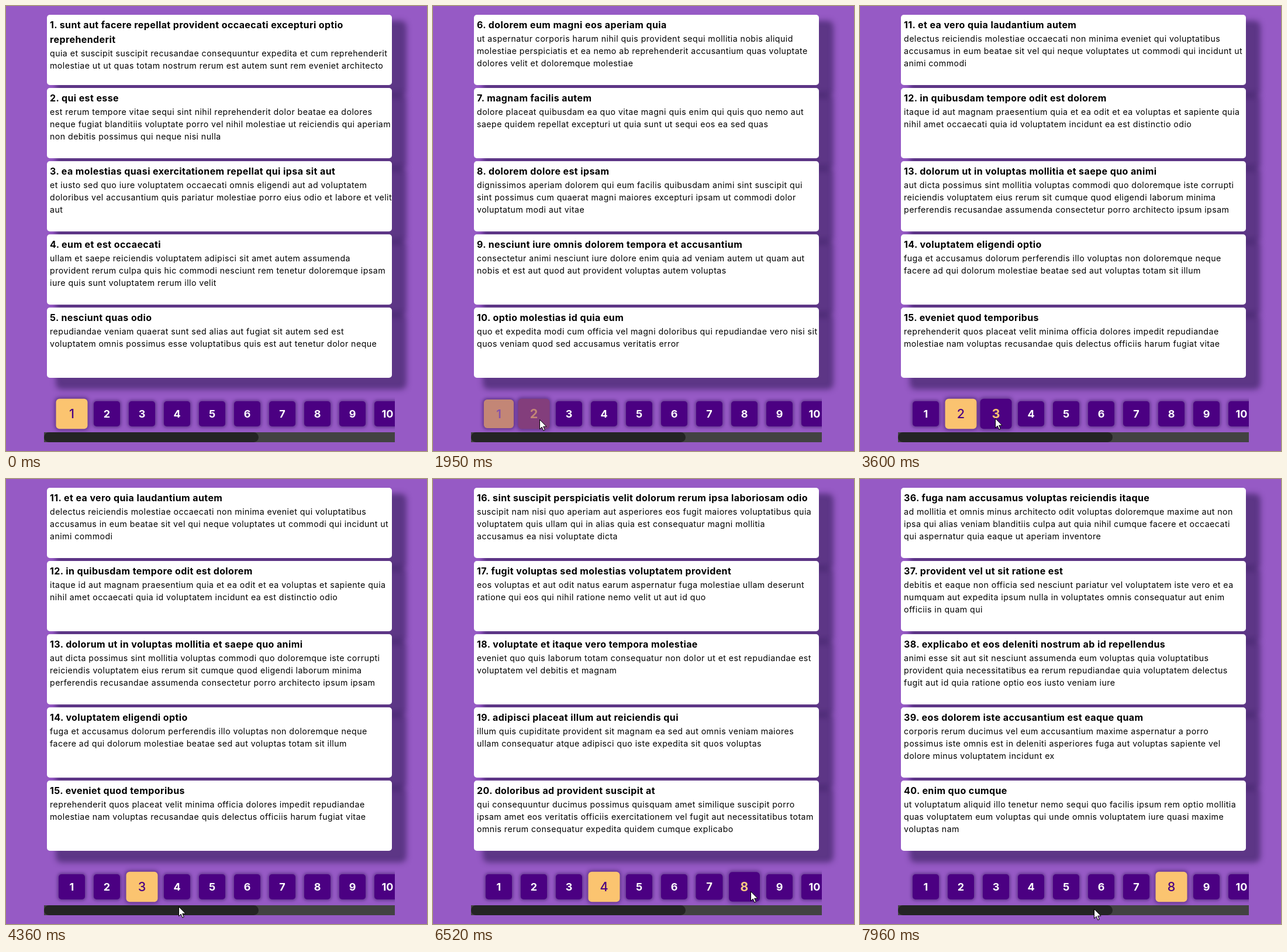
Write an HTML page that moves like this. It is 720 px wide and 760 px high and loops after 8 s.

```html
<!DOCTYPE html>
<html lang="la">
<head>
<meta charset="utf-8">
<title>Paged posts</title>
<style>
  html, body { margin: 0; width: 100%; height: 100%; overflow: hidden; background: #965ac5; }
  body { position: relative; font-family: Inter, "Open Sans", sans-serif; color: #000; }
  .card {
    position: absolute; left: 70px; width: 590px; height: 120px; padding: 5px;
    box-sizing: border-box; border-radius: 5px; background: #fff; white-space: nowrap;
    box-shadow: 20px 15px 10px 5px rgba(35, 18, 72, .5);
  }
  .card h2 { margin: 0; font-size: 16px; font-weight: 700; line-height: 25px; letter-spacing: .4px; }
  .card p { margin: 0; font-size: 14.2px; font-weight: 400; line-height: 21px; letter-spacing: .44px; }
  #pager { position: absolute; left: 65px; top: 660px; width: 600px; height: 85px; overflow: hidden; }
  .btn {
    position: absolute; top: 15px; width: 45px; height: 43px; border-radius: 5px;
    font-size: 18px; line-height: 43px; text-align: center;
    box-shadow: 0 0 5px 2px rgba(45, 15, 85, .5);
  }
  #track { position: absolute; top: 68px; width: 600px; height: 17px; background: #424242; }
  #thumb { width: 367px; height: 17px; border-radius: 9px; background: #242424; }
  #cursor { position: absolute; left: 0; top: 0; overflow: visible; }
</style>
</head>
<body>
<div id="cards"></div>
<div id="pager"><div id="track"><div id="thumb"></div></div></div>
<svg id="cursor" width="13" height="20">
  <path d="M.5 .5V16.6L4.2 13.1 6.8 19.2 9.3 18.1 6.7 12.2H12Z" fill="#fff" stroke="#000"/>
</svg>
<script>
const LOOP = 8000, FADE = 400;

// One post per row: title|line|line; "/" breaks a title.
const pages = {
1: `sunt aut facere repellat provident occaecati excepturi optio/reprehenderit|quia et suscipit suscipit recusandae consequuntur expedita et cum reprehenderit|molestiae ut ut quas totam nostrum rerum est autem sunt rem eveniet architecto
qui est esse|est rerum tempore vitae sequi sint nihil reprehenderit dolor beatae ea dolores|neque fugiat blanditiis voluptate porro vel nihil molestiae ut reiciendis qui aperiam|non debitis possimus qui neque nisi nulla
ea molestias quasi exercitationem repellat qui ipsa sit aut|et iusto sed quo iure voluptatem occaecati omnis eligendi aut ad voluptatem|doloribus vel accusantium quis pariatur molestiae porro eius odio et labore et velit|aut
eum et est occaecati|ullam et saepe reiciendis voluptatem adipisci sit amet autem assumenda|provident rerum culpa quis hic commodi nesciunt rem tenetur doloremque ipsam|iure quis sunt voluptatem rerum illo velit
nesciunt quas odio|repudiandae veniam quaerat sunt sed alias aut fugiat sit autem sed est|voluptatem omnis possimus esse voluptatibus quis est aut tenetur dolor neque`,
2: `dolorem eum magni eos aperiam quia|ut aspernatur corporis harum nihil quis provident sequi mollitia nobis aliquid|molestiae perspiciatis et ea nemo ab reprehenderit accusantium quas voluptate|dolores velit et doloremque molestiae
magnam facilis autem|dolore placeat quibusdam ea quo vitae magni quis enim qui quis quo nemo aut|saepe quidem repellat excepturi ut quia sunt ut sequi eos ea sed quas
dolorem dolore est ipsam|dignissimos aperiam dolorem qui eum facilis quibusdam animi sint suscipit qui|sint possimus cum quaerat magni maiores excepturi ipsam ut commodi dolor|voluptatum modi aut vitae
nesciunt iure omnis dolorem tempora et accusantium|consectetur animi nesciunt iure dolore enim quia ad veniam autem ut quam aut|nobis et est aut quod aut provident voluptas autem voluptas
optio molestias id quia eum|quo et expedita modi cum officia vel magni doloribus qui repudiandae vero nisi sit|quos veniam quod sed accusamus veritatis error`,
3: `et ea vero quia laudantium autem|delectus reiciendis molestiae occaecati non minima eveniet qui voluptatibus|accusamus in eum beatae sit vel qui neque voluptates ut commodi qui incidunt ut|animi commodi
in quibusdam tempore odit est dolorem|itaque id aut magnam praesentium quia et ea odit et ea voluptas et sapiente quia|nihil amet occaecati quia id voluptatem incidunt ea est distinctio odio
dolorum ut in voluptas mollitia et saepe quo animi|aut dicta possimus sint mollitia voluptas commodi quo doloremque iste corrupti|reiciendis voluptatem eius rerum sit cumque quod eligendi laborum minima|perferendis recusandae assumenda consectetur porro architecto ipsum ipsam
voluptatem eligendi optio|fuga et accusamus dolorum perferendis illo voluptas non doloremque neque|facere ad qui dolorum molestiae beatae sed aut voluptas totam sit illum
eveniet quod temporibus|reprehenderit quos placeat velit minima officia dolores impedit repudiandae|molestiae nam voluptas recusandae quis delectus officiis harum fugiat vitae`,
4: `sint suscipit perspiciatis velit dolorum rerum ipsa laboriosam odio|suscipit nam nisi quo aperiam aut asperiores eos fugit maiores voluptatibus quia|voluptatem quis ullam qui in alias quia est consequatur magni mollitia|accusamus ea nisi voluptate dicta
fugit voluptas sed molestias voluptatem provident|eos voluptas et aut odit natus earum aspernatur fuga molestiae ullam deserunt|ratione qui eos qui nihil ratione nemo velit ut aut id quo
voluptate et itaque vero tempora molestiae|eveniet quo quis laborum totam consequatur non dolor ut et est repudiandae est|voluptatem vel debitis et magnam
adipisci placeat illum aut reiciendis qui|illum quis cupiditate provident sit magnam ea sed aut omnis veniam maiores|ullam consequatur atque adipisci quo iste expedita sit quos voluptas
doloribus ad provident suscipit at|qui consequuntur ducimus possimus quisquam amet similique suscipit porro|ipsam amet eos veritatis officiis exercitationem vel fugit aut necessitatibus totam|omnis rerum consequatur expedita quidem cumque explicabo`,
8: `fuga nam accusamus voluptas reiciendis itaque|ad mollitia et omnis minus architecto odit voluptas doloremque maxime aut non|ipsa qui alias veniam blanditiis culpa aut quia nihil cumque facere et occaecati|qui aspernatur quia eaque ut aperiam inventore
provident vel ut sit ratione est|debitis et eaque non officia sed nesciunt pariatur vel voluptatem iste vero et ea|numquam aut expedita ipsum nulla in voluptates omnis consequatur aut enim|officiis in quam qui
explicabo et eos deleniti nostrum ab id repellendus|animi esse sit aut sit nesciunt assumenda eum voluptas quia voluptatibus|provident quia necessitatibus ea rerum repudiandae quia voluptatem delectus|fugit aut id quia ratione optio eos iusto veniam iure
eos dolorem iste accusantium est eaque quam|corporis rerum ducimus vel eum accusantium maxime aspernatur a porro|possimus iste omnis est in deleniti asperiores fuga aut voluptas sapiente vel|dolore minus voluptatem incidunt ex
enim quo cumque|ut voluptatum aliquid illo tenetur nemo sequi quo facilis ipsum rem optio mollitia|quas voluptatem eum voluptas qui unde omnis voluptatem iure quasi maxime|voluptas nam`
};

// [start, end] of each button's selected and hovered spells
const selected = { 1: [-FADE, 1890], 2: [1890, 3600], 3: [3600, 5330], 4: [5330, 7060], 8: [7060, 9000] };
const hovered = { 2: [980, 2340], 3: [2360, 3950], 4: [4760, 5740], 7: [6080, 6270], 8: [6280, 7500] };

// Pointer tip: [time, x, y]
const route = [
  [260, 693, 757], [540, 560, 752], [820, 320, 738], [960, 225, 722], [1090, 180, 711],
  [1290, 182, 706], [1960, 182, 706], [2360, 211, 703], [2510, 217, 704], [2870, 227, 704],
  [3010, 228, 704], [3210, 228, 704], [3340, 231, 704], [3800, 231, 704], [4360, 295, 730],
  [4600, 350, 724], [4850, 312, 706], [5130, 295, 697], [5640, 295, 697], [5850, 360, 734],
  [5980, 415, 727], [6100, 460, 717], [6280, 508, 714], [6520, 543, 704], [6660, 549, 704],
  [6790, 548, 704], [7200, 548, 704], [7500, 500, 722], [7820, 403, 729], [7960, 400, 734],
  [8000, 400, 734]
];

const WHITE = [255, 255, 255], INDIGO = [75, 0, 130], AMBER = [251, 196, 112];
const $ = id => document.getElementById(id);
const mix = (a, b, k) => a.map((v, i) => v + (b[i] - v) * k);
const rgb = c => `rgb(${c.map(Math.round)})`;
const ease = ms => 1 - (1 - Math.min(1, Math.max(0, ms / FADE))) ** 2.3;
const level = (span, t) => span ? ease(t - span[0]) - ease(t - span[1]) : 0;

const buttons = Array.from({ length: 10 }, (_, i) => {
  const b = document.createElement("div");
  b.className = "btn";
  b.style.left = 25 + 60 * i + "px";
  b.textContent = i + 1;
  $("pager").append(b);
  return b;
});

let shown;
function showPage(n) {
  if (n === shown) return;
  shown = n;
  $("cards").innerHTML = pages[n].split("\n").map((post, i) => {
    const [title, ...lines] = post.split("|");
    return `<div class="card" style="top:${15 + 125 * i}px">
      <h2>${n * 5 - 4 + i}. ${title.replace("/", "<br>")}</h2><p>${lines.join("<br>")}</p></div>`;
  }).join("");
}

function drawButton(b, i, t) {
  const on = level(selected[i + 1], t), over = level(hovered[i + 1], t);
  b.style.transform = `scale(${1 + .2 * Math.max(on, over)})`;
  b.style.background = rgb(mix(INDIGO, AMBER, on));
  b.style.color = rgb(mix(mix(WHITE, AMBER, over), INDIGO, on));
  b.style.fontWeight = Math.round(700 - 150 * on);
}

function drawCursor(t) {
  $("cursor").style.display = t < route[0][0] ? "none" : "block";
  const i = Math.max(1, route.findIndex(p => p[0] > t));
  const a = route[i - 1], b = route[i];
  const [, x, y] = mix(a, b, (t - a[0]) / (b[0] - a[0]));
  $("cursor").style.transform = `translate(${Math.round(x)}px, ${Math.round(y)}px)`;
}

function draw() {
  const t = performance.now() % LOOP;
  showPage(+Object.keys(selected).find(n => t < selected[n][1]));
  buttons.forEach((b, i) => drawButton(b, i, t));
  drawCursor(t);
  requestAnimationFrame(draw);
}
draw();
</script>
</body>
</html>
```
